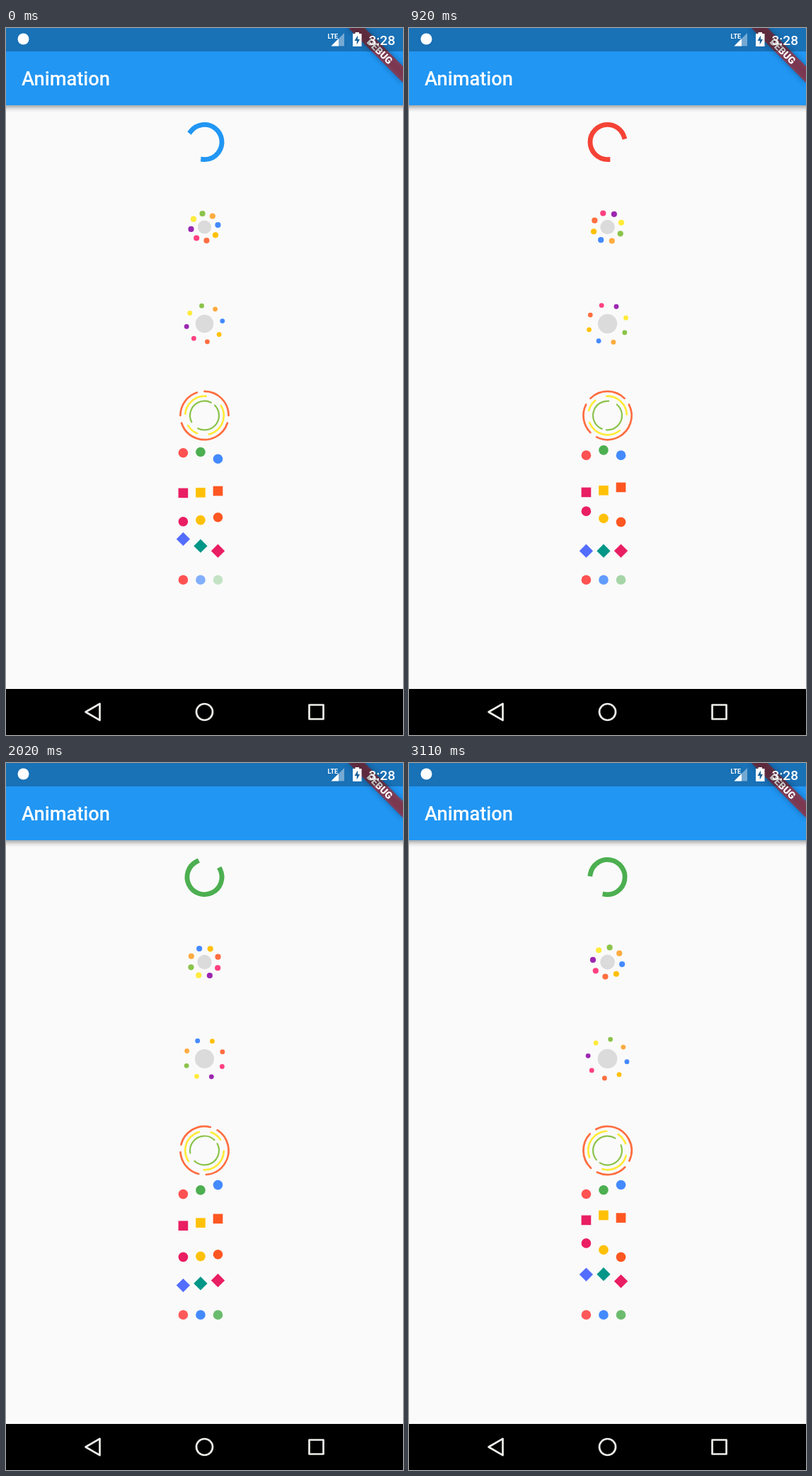
An HTML page with a canvas that plays this animation: 561x998 px, repeating every 3.14 s.

```html
<!DOCTYPE html>
<html lang="en">
<head>
<meta charset="utf-8">
<title>Animation</title>
<style>
html, body { margin: 0; width: 100%; height: 100%; overflow: hidden; background: #fafafa; }
canvas { display: block; }
</style>
</head>
<body>
<canvas id="stage" width="561" height="998"></canvas>
<script>
const ctx = document.getElementById('stage').getContext('2d');
const W = 561, H = 998, DP = W / 411.4, LOOP = 3140;
const TAU = Math.PI * 2, RAD = Math.PI / 180, MID = 280.5;
const FONT = 'Roboto, "Open Sans", sans-serif';

const BLUE = '#2196f3', GREEN = '#4caf50', AMBER = '#ffc107', ORANGE = '#ff5722';
const PINK = '#e91e63', YELLOW = '#ffeb3b', LIME = '#8bc34a', CORAL = '#ff6e40';
const RED_ACC = '#ff5252', BLUE_ACC = '#448aff';
const RING = [AMBER, CORAL, '#ff4081', '#9c27b0', YELLOW, LIME, '#ffab40', BLUE_ACC];

// loop time, app time, refreshes until the next key
const KEYS = [
  [0, 0, 2], [80, 90, 1], [260, 350, 5], [430, 540, 12], [920, 1050, 17],
  [1690, 1770, 7], [2020, 2147, 15], [2670, 2765, 10], [3110, 3145, 1], [LOOP, 3175, 1]
];

function appTime(t) {
  let i = 0;
  while (i < KEYS.length - 2 && t >= KEYS[i + 1][0]) i++;
  const [t0, r0, n] = KEYS[i], [t1, r1] = KEYS[i + 1];
  return r0 + (r1 - r0) * Math.floor((t - t0) / (t1 - t0) * n + 1e-6) / n;
}

const clamp = x => Math.min(1, Math.max(0, x));
const frac = x => x - Math.floor(x);
const decelerate = x => 1 - (1 - x) * (1 - x);
const elasticOut = x => 1 + 2 ** (-10 * x) * Math.sin((x - 0.1) * TAU / 0.4);
const elasticIn = x => 1 - elasticOut(1 - x);

function bezier(x1, y1, x2, y2) {
  const at = (a, b, s) => 3 * (1 - s) * (1 - s) * s * a + 3 * (1 - s) * s * s * b + s * s * s;
  return x => {
    if (x <= 0 || x >= 1) return clamp(x);
    let lo = 0, hi = 1;
    for (let i = 0; i < 24; i++) {
      const s = (lo + hi) / 2;
      if (at(x1, x2, s) < x) lo = s; else hi = s;
    }
    return at(y1, y2, lo);
  };
}
const fastOutSlowIn = bezier(0.4, 0, 0.2, 1);
const easeIn = bezier(0.42, 0, 1, 1);

function disc(x, y, r, color) {
  ctx.fillStyle = color;
  ctx.beginPath();
  ctx.arc(x, y, r, 0, TAU);
  ctx.fill();
}

function poly(color, ...pts) {
  ctx.fillStyle = color;
  ctx.beginPath();
  for (const [x, y] of pts) ctx.lineTo(x, y);
  ctx.closePath();
  ctx.fill();
}

function box(x, y, w, h, color) {
  ctx.fillStyle = color;
  ctx.fillRect(x, y, w, h);
}

// start and sweep in degrees
function arc(x, y, r, start, sweep, width, color, cap) {
  ctx.strokeStyle = color;
  ctx.lineWidth = width;
  ctx.lineCap = cap;
  ctx.beginPath();
  ctx.arc(x, y, r, start * RAD, (start + sweep) * RAD);
  ctx.stroke();
}

function label(str, x, y, font, align) {
  ctx.fillStyle = '#fff';
  ctx.font = font + ' ' + FONT;
  ctx.textAlign = align;
  ctx.fillText(str, x, y);
}

function drawBanner() {
  const off = 40 * DP, h = 12 * DP;
  ctx.save();
  ctx.translate(W, 0);
  ctx.rotate(Math.PI / 4);
  ctx.shadowColor = 'rgba(0,0,0,.5)';
  ctx.shadowBlur = 8;
  box(-off, off - h, off * 2, h, 'rgba(183,28,28,.63)');
  ctx.shadowColor = 'transparent';
  label('DEBUG', 0, off - h / 2 + 5, '900 13.9px', 'center');
  ctx.restore();
}

function drawStatus() {
  box(0, 0, W, 33, 'rgba(0,0,0,.25)');
  disc(24.5, 15.5, 8, '#fff');
  label('LTE', 454.5, 15, 'bold 9px', 'left');
  poly('rgba(255,255,255,.4)', [478, 7], [478, 25.5], [459.5, 25.5]);
  poly('#fff', [470, 15], [470, 25.5], [459.5, 25.5]);
  box(490, 8, 12.5, 18, '#fff');
  box(493.5, 6, 5.5, 3, '#fff');
  poly('#1a5f96', [497, 10.5], [492.5, 18], [495.7, 18], [495.7, 23.5], [500, 16], [497, 16]);
  label('3:28', 550, 23.5, '500 19.1px', 'right');
}

function drawNav() {
  box(0, 933, W, 65, '#000');
  ctx.strokeStyle = '#eeeeea';
  ctx.lineWidth = 2.7;
  ctx.lineJoin = 'round';
  ctx.beginPath();
  ctx.moveTo(112.5, 965.5);
  ctx.lineTo(132.5, 953.8);
  ctx.lineTo(132.5, 977.2);
  ctx.closePath();
  ctx.stroke();
  arc(MID, 965.5, 11.5, 0, 360, 2.7, '#eeeeea', 'butt');
  ctx.strokeRect(428.5, 955.5, 20, 20);
}

function drawChrome() {
  box(0, 0, W, H, '#fafafa');
  ctx.save();
  ctx.shadowColor = 'rgba(0,0,0,.4)';
  ctx.shadowBlur = 7;
  ctx.shadowOffsetY = 3;
  box(-10, 0, W + 20, 109, BLUE);
  ctx.restore();
  label('Animation', 22, 81, '500 27.3px', 'left');
  drawBanner();
  drawStatus();
  drawNav();
}

function drawSpinner(r) {
  const turn = 1.3 + r / 1000, step = Math.floor(turn), p = turn - step;
  const head = fastOutSlowIn(clamp(p * 2)), tail = fastOutSlowIn(clamp(p * 2 - 1));
  const start = -90 + 270 * tail + 306 * p - 144 * step;
  const color = r < 850 ? BLUE : r < 2050 ? '#f44336' : GREEN;
  arc(MID, 161, 18 * DP, start, Math.max(270 * (head - tail), 0.1), 5 * DP, color, 'square');
}

function drawRing(r, y, radius, dot) {
  const p = frac(0.1005 + r / 3000);
  let k = 1;
  if (p <= 0.25) k = elasticOut(p * 4);
  else if (p >= 0.75) k = 1 - elasticIn(p * 4 - 3);
  const size = radius * DP * k;
  disc(MID, y, Math.abs(size) / 2, 'rgba(0,0,0,.12)');
  RING.forEach((color, i) => {
    const a = p * TAU + i * TAU / 8;
    disc(MID + size * Math.cos(a), y + size * Math.sin(a), dot * DP / 2, color);
  });
}

function drawArcs(r) {
  const set = (radius, turn, width, color, parts) => {
    for (const [a, sweep] of parts) arc(MID, 547, radius * DP, turn * 360 + a, sweep, width, color, 'round');
  };
  set(25, frac(0.75 + r / 1200), 2.7, CORAL, [[0, 90], [108, 144], [270, 72]]);
  set(20, easeIn(frac(0.668 + r / 900)), 2.7, YELLOW, [[0, 90], [144, 108], [288, 36]]);
  set(15, decelerate(frac(0.646 + r / 2000)), 2.2, LIME, [[0, 162], [198, 144]]);
}

const shapes = {
  circle: (x, y, c) => disc(x, y, 5 * DP, c),
  square: (x, y, c) => box(x - 5 * DP, y - 5 * DP, 10 * DP, 10 * DP, c),
  diamond: (x, y, c) => {
    const d = 5 * DP * Math.SQRT2;
    poly(c, [x, y - d], [x + d, y], [x, y + d], [x - d, y]);
  }
};
const ROWS = [
  { shape: 'circle', colors: [RED_ACC, GREEN, BLUE_ACC], period: 1000, phase: 0.265 },
  { shape: 'square', colors: [PINK, AMBER, ORANGE], period: 1200, phase: 0.715 },
  { shape: 'circle', colors: [PINK, AMBER, ORANGE], period: 2000, phase: 0.62 },
  { shape: 'diamond', colors: ['#536dfe', '#009688', PINK], period: 1500, phase: 0.163 }
];
const dotX = i => 250.4 + i * 18 * DP;
const stagger = (p, i) => clamp((p - i * 0.1) / 0.7);

function drawBounce(r, row, n) {
  const p = frac(row.phase + r / row.period), y = 615.5 + n * 30 * DP;
  row.colors.forEach((color, i) => {
    const a = decelerate(stagger(p, i));
    shapes[row.shape](dotX(i), y - 30 * DP * Math.min(a, 1 - a), color);
  });
}

function drawFade(r) {
  const p = frac(0.286 + r / 1000);
  [RED_ACC, BLUE_ACC, GREEN].forEach((color, i) => {
    const a = stagger(p, i);
    ctx.globalAlpha = clamp(2.5 * Math.min(a, 1 - a));
    disc(dotX(i), 779, 5 * DP, color);
  });
  ctx.globalAlpha = 1;
}

function draw(t) {
  const r = appTime(t);
  drawChrome();
  drawSpinner(r);
  drawRing(r, 281, 15, 6);
  drawRing(r, 417.5, 20, 5);
  drawArcs(r);
  ROWS.forEach((row, n) => drawBounce(r, row, n));
  drawFade(r);
}

const began = performance.now();
function tick() {
  draw((performance.now() - began) % LOOP);
  requestAnimationFrame(tick);
}
tick();
</script>
</body>
</html>
```
